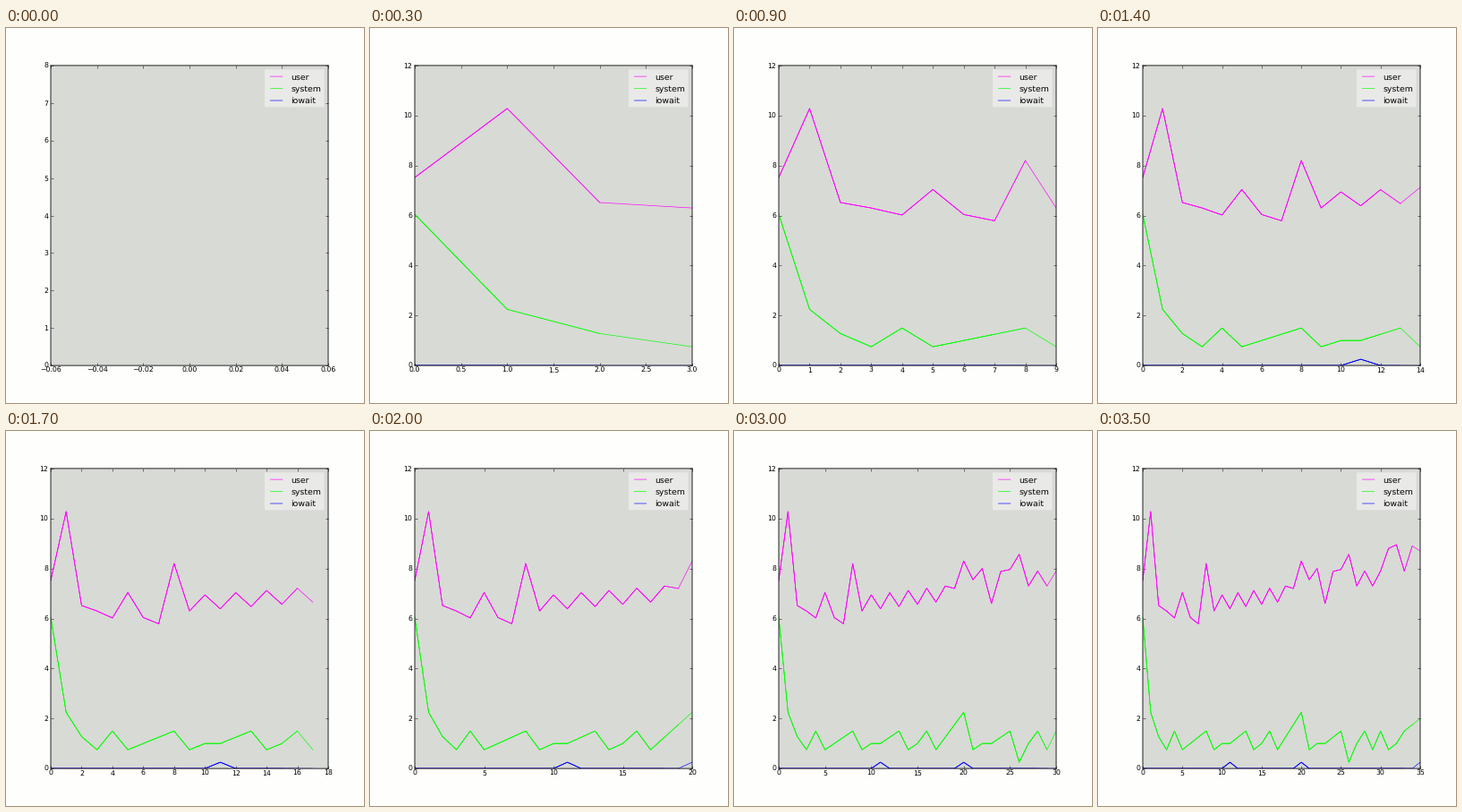
Recreate the animation shown at these times as a matplotlib script. Size 400 by 419 pixels, loop 3.6 s.

```python
import math

import matplotlib.pyplot as plt
import numpy as np
from matplotlib.animation import FuncAnimation
from matplotlib.lines import Line2D
from matplotlib.patches import Rectangle
from matplotlib.transforms import Affine2D

W, H, DPI = 400, 419, 64
PX = 72 / DPI  # points per pixel
PT = 0.65      # pixels per nominal chart point
STEPS = 36
LAYERS = 3     # each update redraws the lines over the older ones
GRAIN = 0.25   # load is sampled in quarters of a percent

t = np.arange(STEPS)


def user_load():
    """A start-up burst, then a zigzag around a slowly rising level."""
    burst = [7.52, 10.28, 6.52, 6.3, 6.02, 7.04, 6.04, 5.79, 8.2]
    level = np.interp(t, [9, 18, 20, 22, 23, 25.5, 27, 30, 31, 33, 35],
                      [6.6, 7, 8, 7.7, 6.9, 8.6, 7.6, 7.6, 9.1, 8.2, 9])
    load = level + np.where(t % 2, -0.3, 0.3)
    load[:len(burst)] = burst
    return load


def system_load():
    """A fast decay, then ramps that drop back right after each peak."""
    peaks = (4, 8, 13, 16, 20, 25, 28, 30, 35)
    low, high = 3 * GRAIN, 6 * GRAIN
    turns = {3: low}
    for p in peaks:
        turns |= {p: high, p + 1: low}
    turns |= {20: 1.5 * high, 26: GRAIN, 35: 8 * GRAIN}
    ramps = np.interp(t, sorted(turns), [turns[k] for k in sorted(turns)])
    decay = 0.95 + 5.1 * np.exp(-1.37 * t)
    return np.where(t < 3, decay, np.round(ramps / GRAIN) * GRAIN)


SERIES = [("user", "#ff00ff", user_load()),
          ("system", "#00ff00", system_load()),
          ("iowait", "#0000ff", GRAIN * np.isin(t, (11, 20, 35)))]

plt.rcParams.update({"font.family": "DejaVu Sans", "text.hinting": "none",
                     "path.snap": False})
fig = plt.figure(figsize=(W / DPI, H / DPI), dpi=DPI, facecolor="#fefefd")
ax = fig.add_axes([0.125, 0.1, 0.775, 0.8], facecolor="#d8dad5")
ax.tick_params(direction="in", top=True, right=True, length=4 * PT * PX,
               width=0.5 * PX, pad=4 * PT * PX, labelsize=12 * PT * PX)
ax.tick_params(axis="x", pad=3 * PT * PX)
for spine in ax.spines.values():
    spine.set_linewidth(0.85 * PX)

lines = [[ax.plot([], [], color=color, lw=PT * PX)[0] for _ in range(LAYERS)]
         for _, color, _ in SERIES]


def add_legend():
    stage = Affine2D().scale(1 / W, -1 / H).translate(0, 1) + fig.transFigure
    fig.add_artist(Rectangle((289, 46.3), 66.5, 42, transform=stage,
                             fc="white", alpha=0.45, lw=0, zorder=5))
    for row, (name, color, _) in enumerate(SERIES):
        y = 54.1 + 13.45 * row
        fig.add_artist(Line2D([295.4, 308.8], [y, y], color=color, lw=PT * PX,
                              transform=stage, zorder=6))
        fig.text(318.4, y + 3.3, name, transform=stage, va="baseline",
                 fontsize=14.4 * PT * PX, zorder=6)


def nice_step(span):
    raw = span / 9
    base = 10 ** math.floor(math.log10(raw))
    return next(m * base for m in (1, 2, 5, 10) if m * base >= raw - 1e-9)


def set_axis(axis, set_lim, first, last, step):
    ticks = np.arange(first, last + 1) * step
    digits = max(0, -math.floor(math.log10(step) + 1e-9))
    axis.set_ticks(ticks, [f"{v:.{digits}f}".replace("-", "\u2212") for v in ticks])
    set_lim(ticks[0], ticks[-1])


def fit(axis, set_lim, top):
    step = nice_step(top)
    set_axis(axis, set_lim, 0, math.ceil(top / step - 1e-9), step)


def update(n):
    for layers, (_, _, load) in zip(lines, SERIES):
        for age, line in enumerate(layers):
            count = max(0, n + 1 - age)
            line.set_data(t[:count], load[:count])
    if n == 0:
        set_axis(ax.xaxis, ax.set_xlim, -3, 3, 0.02)
    else:
        fit(ax.xaxis, ax.set_xlim, n)
    fit(ax.yaxis, ax.set_ylim, max(SERIES[0][2][:n + 1]))
    return [line for layers in lines for line in layers]


add_legend()
anim = FuncAnimation(fig, update, frames=STEPS, interval=100, repeat=True,
                     repeat_delay=0, init_func=lambda: update(0), blit=False)
plt.show()
```
